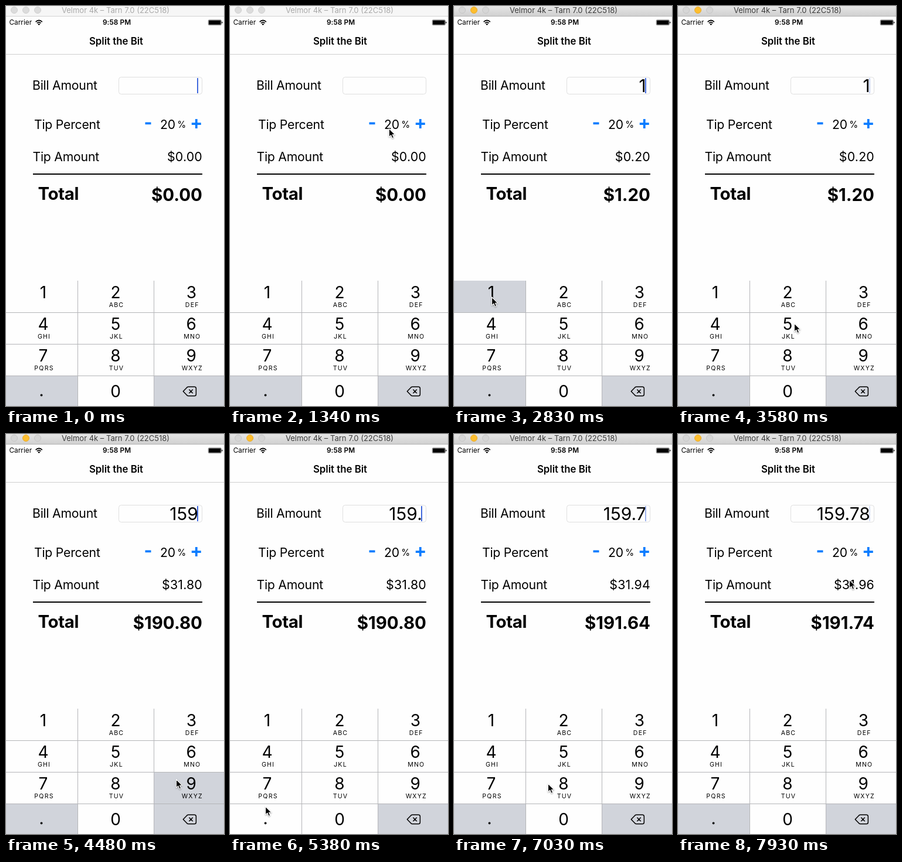
An HTML page for the animation above (8000 ms loop, 372 by 683 pixels).

```html
<!DOCTYPE html>
<html lang="en">
<head>
<meta charset="utf-8">
<title>Tip calculator</title>
<style>
html, body { margin: 0; width: 100%; height: 100%; overflow: hidden; background: #fff; }
svg { display: block; width: 372px; height: 683px; font-family: Inter, "Open Sans", sans-serif; }
text { white-space: pre; }
.label { font-size: 21.2px; letter-spacing: -.22px; }
.amount { font-size: 21.4px; letter-spacing: .15px; }
.big { font-size: 29.5px; font-weight: 700; }
.end { text-anchor: end; }
.mid { text-anchor: middle; }
.digit { font-size: 28px; text-anchor: middle; }
.letters { font-size: 10.6px; letter-spacing: 1.2px; text-anchor: middle; }
#mouse { filter: drop-shadow(.5px 1px .8px rgba(0, 0, 0, .35)); }
</style>
</head>
<body>
<svg viewBox="0 0 372 683">
  <defs>
    <linearGradient id="chrome" x2="0" y2="1">
      <stop stop-color="#e6e6e6"/><stop offset="1" stop-color="#d0d0d0"/>
    </linearGradient>
  </defs>
  <rect width="372" height="683" fill="#fefefe"/>

  <rect id="bar" width="372" height="17"/>
  <rect id="barLine" y="17" width="372" height="1"/>
  <g id="dots" stroke-width="1">
    <circle cx="14" cy="7" r="5.5"/><circle cx="34" cy="7" r="5.5"/><circle cx="54" cy="7" r="5.5"/>
  </g>
  <text id="barTitle" class="mid" x="187" y="12" font-size="13">Velmor 4k – Tarn 7.0 (22C518)</text>

  <text x="5.5" y="32.3" font-size="11.8">Carrier</text>
  <g fill="none" stroke="#000" stroke-width="1.7">
    <path d="M50.6 27.2Q56.2 21.8 61.8 27.2M52.8 29.4Q56.2 26.2 59.6 29.4"/>
    <path d="M56.2 33L54.2 31Q56.2 29.2 58.2 31Z" fill="#000" stroke="none"/>
  </g>
  <text class="mid" x="189" y="32.3" font-size="11.8" font-weight="600" letter-spacing=".1">9:58 PM</text>
  <rect x="345.2" y="23.8" width="22.2" height="8.8" rx="1.6" fill="none" stroke="#000" stroke-width=".5"/>
  <rect x="346" y="24.6" width="20.6" height="7.2" rx=".8"/>
  <rect x="368.2" y="26.7" width="1.2" height="3" rx=".6"/>
  <text class="mid" x="188" y="66.2" font-size="16.8" font-weight="600">Split the Bit</text>
  <rect y="82" width="372" height="1" fill="#cfcfcf"/>

  <text class="label" x="45" y="142.9">Bill Amount</text>
  <rect x="192.5" y="121.5" width="142" height="29" rx="4" fill="#fefefe" stroke="#dfdfdf"/>
  <text id="bill" class="end" x="327.8" y="147" font-size="30"></text>
  <rect id="caret" x="326" y="123" width="2" height="26" fill="#4169dc"/>

  <text class="label" x="48" y="209.7">Tip Percent</text>
  <path d="M237.5 198.5h10v3.8h-10zM316.8 199.2h16v3.8h-16zM322.9 193h3.8v16h-3.8z" fill="#0a7cff"/>
  <text class="label" x="263" y="209.5">20</text>
  <text x="292.3" y="207.6" font-size="15.2">%</text>

  <text class="label" x="45.5" y="264.8">Tip Amount</text>
  <text id="tip" class="amount end" x="335" y="264.6"></text>
  <rect x="46" y="286" width="289" height="2"/>
  <text class="big" x="54.5" y="330.8" letter-spacing="-.4">Total</text>
  <text id="total" class="big end" x="335" y="332.7"></text>

  <g id="pad"></g>
  <path id="mouse" d="M0 0V14.2L3.3 11.2L5.6 16.4L8.1 15.3L5.9 10.3H10.4Z" stroke="#fff" stroke-width="1.1" stroke-linejoin="round"/>
</svg>
<script>
const LOOP = 8000, STEP = 150, LEAD = 20;
const $ = id => document.getElementById(id);
const set = (el, attrs) => { for (const k in attrs) el.setAttribute(k, attrs[k]); };
const NS = "http://www.w3.org/2000/svg";
const add = (tag, attrs, text = "") => {
  const el = document.createElementNS(NS, tag);
  set(el, attrs);
  el.textContent = text;
  $("pad").append(el);
  return el;
};

// Keypad
const GREY = "#d1d4db", WHITE = "#fefefe";
const colX = [0, 122, 252, 372], rowY = [469, 523, 577, 631, 683], centre = [63.5, 187, 316.3];
const keys = {};
const names = ["1", "2 ABC", "3 DEF", "4 GHI", "5 JKL", "6 MNO", "7 PQRS", "8 TUV", "9 WXYZ", ".", "0", "<"];
names.forEach((name, i) => {
  const c = i % 3, r = Math.floor(i / 3), [digit, letters] = name.split(" ");
  const rest = ".<".includes(digit) ? GREY : WHITE;
  const face = add("rect", {
    x: colX[c], y: rowY[r], width: colX[c + 1] - colX[c], height: rowY[r + 1] - rowY[r], fill: rest
  });
  keys[digit] = { face, rest, held: rest === GREY ? WHITE : GREY };
  if (digit === ".") add("circle", { cx: 60.5, cy: 664.5, r: 1.9 });
  else if (digit !== "<") add("text", { class: "digit", x: centre[c], y: r < 3 ? 499 + 54 * r : 668 }, digit);
  if (letters) add("text", { class: "letters", x: centre[c] + 1.5, y: 514 + 54 * r }, letters);
});
add("path", {
  d: "M122.5 469V683M252.5 469V683M0 523.5H372M0 577.5H372M0 631.5H372",
  stroke: "#b4b5b8", fill: "none"
});
add("path", {
  d: "M302.3 658L308.6 651.4Q309.8 650.2 311.4 650.2H321.6Q324.4 650.2 324.4 653V663Q324.4 665.8 321.6 665.8H311.4Q309.8 665.8 308.6 664.6ZM312.4 654.8L318.8 661.2M318.8 654.8L312.4 661.2",
  stroke: "#000", "stroke-width": 1.5, fill: "none", "stroke-linejoin": "round"
});

// Times below are counted in steps of the clock
const ACTIVE = 18;
const presses = [["1", 19, 20], ["5", 25, 26], ["9", 29, 31], [".", 36, 37], ["7", 43, 44], ["8", 48, 49]];
const blink = [[0, 1], [1, 0], [4, 1], [7, 0], [10, 1], [13, 0], [19, 1], [24, .3], [25, 1],
  [33, .3], [34, 0], [36, 1], [40, 0], [42, .3], [43, 1], [47, .5], [48, 1], [52, 0], [53, .2]];
const trail = [[7, 296, 196], [10, 262, 214], [14, 228, 292], [16, 2, 531], [18, 64, 497], [21, 64, 497],
  [24, 198, 542], [26, 198, 542], [28, 290, 589], [31, 290, 590], [34, 60, 636], [38, 60, 636],
  [41, 67, 606], [44, 67, 606], [47, 160, 597], [50, 160, 597], [53, 292, 249]];

const ease = u => u * u * (3 - 2 * u);
const latest = (list, n) => list.filter(e => e[0] <= n).pop();

function mouseAt(n) {
  const a = latest(trail, n);
  if (!a) return null;
  const b = trail[trail.indexOf(a) + 1] || a;
  const u = b === a ? 0 : ease((n - a[0]) / (b[0] - a[0]));
  return [a[1] + (b[1] - a[1]) * u, a[2] + (b[2] - a[2]) * u];
}

function drawBar(active) {
  set($("bar"), { fill: active ? "url(#chrome)" : "#f6f6f6" });
  set($("barLine"), { fill: active ? "#b3b3b3" : "#d2d2d2" });
  set($("barTitle"), { fill: active ? "#3c3c3c" : "#a9a9a9" });
  [...$("dots").children].forEach((dot, i) => set(dot, active && i === 1
    ? { fill: "#fdbe2f", stroke: "#e9ab2b" }
    : { fill: active ? "#d6d6d6" : "#dcdcdc", stroke: active ? "#c6c6c6" : "#cfcfcf" }));
}

function render(t) {
  const n = Math.floor((t + LEAD) / STEP);
  drawBar(n >= ACTIVE);

  const bill = presses.filter(p => p[1] <= n).map(p => p[0]).join("");
  const cents = Math.round((Number(bill) || 0) * 100);
  $("bill").textContent = bill;
  $("tip").textContent = "$" + (Math.round(cents * .2) / 100).toFixed(2);
  $("total").textContent = "$" + (Math.round(cents * 1.2) / 100).toFixed(2);
  set($("caret"), { opacity: latest(blink, n)[1] });

  for (const [key, down, up] of presses) {
    const k = keys[key];
    set(k.face, { fill: n >= down && n < up ? k.held : k.rest });
  }

  const m = mouseAt(n);
  set($("mouse"), m
    ? { visibility: "visible", transform: `translate(${m[0] + .5} ${m[1]})` }
    : { visibility: "hidden" });
}

const start = performance.now();
function tick() {
  render((performance.now() - start) % LOOP);
  requestAnimationFrame(tick);
}
tick();
</script>
</body>
</html>
```
